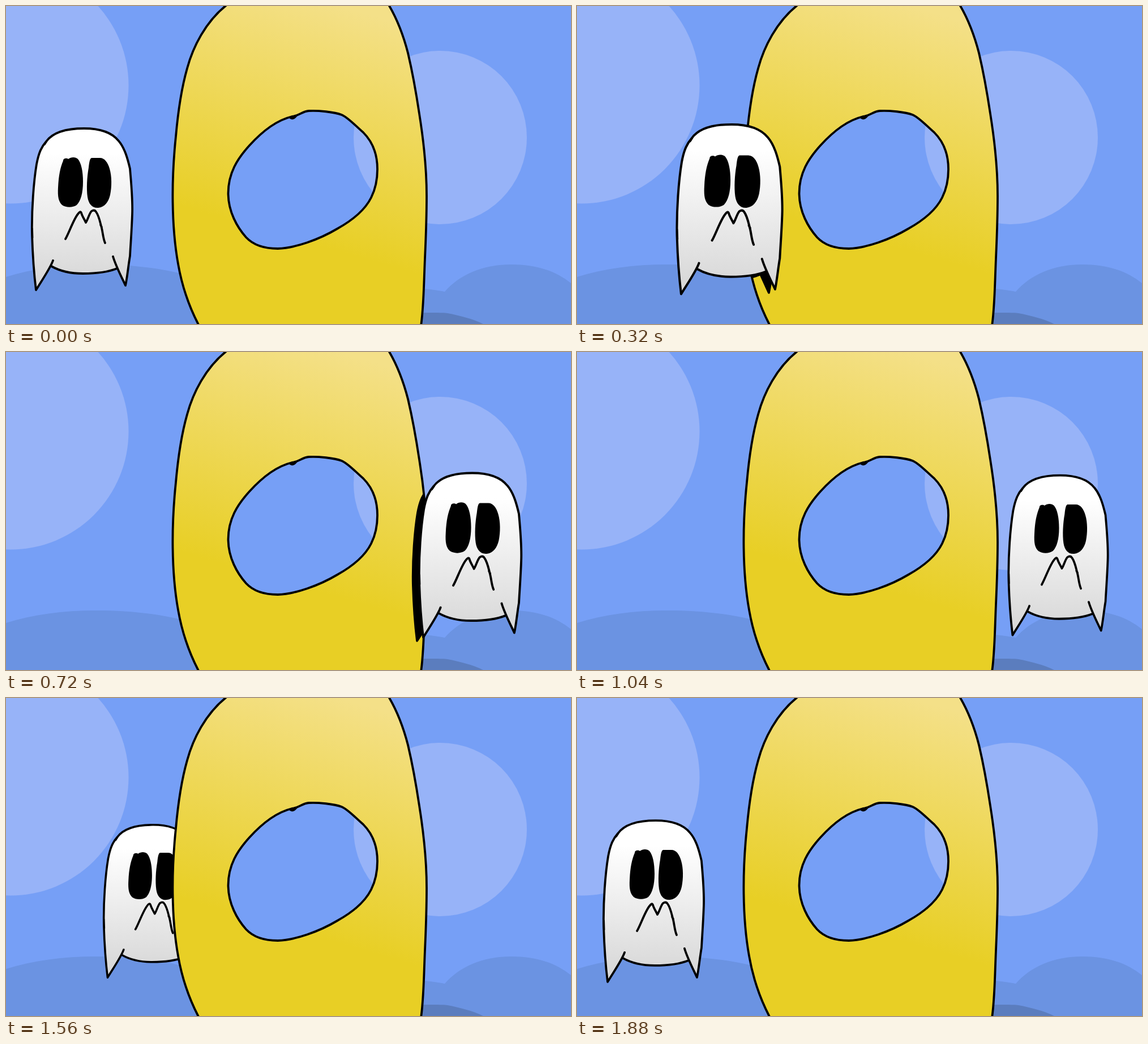
An HTML page for the animation above (1.92 s loop, 998x561 px).

```html
<!DOCTYPE html>
<html lang="en">
<head>
<meta charset="utf-8">
<title>Ghost orbit</title>
<style>
  html, body { margin: 0; width: 100%; height: 100%; overflow: hidden; background: #769ff6; }
  svg { display: block; width: 100vw; height: 100vh; }
  .line { fill: none; stroke: #000; stroke-width: 3.8; stroke-linecap: round; stroke-linejoin: round; }
</style>
</head>
<body>
<svg viewBox="0 0 998 561" preserveAspectRatio="none">
  <defs>
    <linearGradient id="gold" gradientUnits="userSpaceOnUse" x1="570" y1="-6" x2="455" y2="395">
      <stop offset="0" stop-color="#f4e088"/>
      <stop offset="1" stop-color="#e8cf25"/>
    </linearGradient>
    <linearGradient id="sheet" gradientUnits="userSpaceOnUse" x1="0" y1="260" x2="0" y2="478">
      <stop offset="0" stop-color="#fff"/>
      <stop offset="1" stop-color="#d9d9d9"/>
    </linearGradient>

    <path id="ring" fill-rule="evenodd" clip-rule="evenodd" d="
      M390 -2 C352 28 330 73 320 110 C308 152 303 196 300 230
      C296 268 294 305 294.500 345 C295 385 298 422 304 455 C311 495 323 530 341 564
      L733 564 C738 530 738 490 740 445 C742 400 743 365 743 335
      C743 285 738 240 730 190 C724 150 718 117 710 83 C702 52 692 25 676 -2 Z
      M505 195 C476 202 450 224 430 246 C409 269 392 295 392.500 332
      C393 363 408 390 424 408 C438 423 458 428 480 428
      C511 427 553 412 585 393 C612 378 634 360 645 338
      C653 322 656 306 656 288 C656 262 647 239 631 223
      C614 208 603 196 593 192 C580 187 551 184 535 185 C522 186 520 193 505 195 Z"/>
    <clipPath id="onRing"><use href="#ring" clip-rule="evenodd"/></clipPath>

    <path id="body" d="M53 501 C50 477 47 437 46 404 C45 359 49 309 54 279
      C58 258 63 248 71 239 C84 221 109 216 138 216 C167 216 187 223 199 238
      C210 251 215 270 219 287 C221 312 224 340 223 367 C222 397 220 421 219 441
      C216 458 214 480 211 493 L197 462 C179 470 159 472 136 472
      C110 472 94 467 80 459 Z"/>

    <g id="ghost">
      <use href="#body" fill="url(#sheet)"/>
      <path class="line" d="M83 449 C79 461 66 480 53 501 C50 477 47 437 46 404
        C45 359 49 309 54 279 C58 258 63 248 71 239 C84 221 109 216 138 216
        C167 216 187 223 199 238 C210 251 215 270 219 287 C221 312 224 340 223 367
        C222 397 220 421 219 441 C216 458 214 480 211 493 C206 482 194 459 189 442
        M80 459 C94 467 110 472 136 472 C159 472 179 470 196 463
        M72 238 L68 244 M46 392 L46.500 409"/>
      <path d="M101 273 C101 268 108 268 110 270 C115 266 123 266 127 270
        C133 277 136 292 136 310 C136 330 132 344 125 351 C118 356 106 356 99 351
        C93 345 91 337 92 320 C93 298 96 285 101 273 Z"/>
      <path d="M151 268 L166 268 C174 268 180 276 183 287 C187 300 187 319 184 333
        C181 346 174 355 163 356 C153 357 146 350 144 337 C142 322 143 302 146 285
        C147 276 148 269 151 268 Z"/>
      <path class="line" d="M105 411 C111 401 119 377 127 367
        C130 363 132 362 133 365 C135 372 139 377 141 382 C145 376 147 366 151 362
        C154 360 157 360 159 363 C164 370 166 380 168 388 C171 397 171 409 175 418
        M167 386 L169 390"/>
    </g>
  </defs>

  <rect width="998" height="561" fill="#769ff6"/>
  <g fill="#97b3f8">
    <circle cx="8" cy="140" r="208.500"/>
    <circle cx="767" cy="232" r="153"/>
  </g>
  <g fill="#6b93e2">
    <path d="M0 478 C48 463 100 456 158 456 C216 456 262 461 310 472 L340 561 H0 Z"/>
    <path d="M700 494 C730 498 755 500 775 504 C801 474 842 456 893 456
      C938 456 972 468 998 489 V561 H700 Z"/>
  </g>
  <path fill="#5b7dbe" d="M700 544 C720 541 758 540 780 542 C801 546 825 552 843 561 H700 Z"/>

  <use id="behind" href="#ghost"/>
  <use href="#ring" fill="url(#gold)"/>
  <g id="shade" clip-path="url(#onRing)">
    <use id="shadow" href="#body" stroke="#000" stroke-width="3.800" stroke-linejoin="round"/>
  </g>
  <use href="#ring" class="line"/>
  <path d="M499 196 C502 201 508 202 513 196 L518 190 L510 193 Z"/>
  <use id="front" href="#ghost"/>
</svg>

<script>
  const LOOP = 1920, STEP = 40, TURN = 940;
  const HOME = { x: 134, y: 358 };

  // time, centre x, scale
  const orbit = [
    [0, 134, 1], [320, 269, 1.05], [440, 486, 1.153], [560, 683, 1.087],
    [720, 819.5, 1.018], [920, 867, 1], [1040, 849.5, 0.989], [1120, 825, 0.981],
    [1280, 703.5, 0.927], [1410, 500, 0.84], [1560, 256, 0.945],
    [1680, 176, 0.98], [1880, 135, 0.999], [1920, 134, 1]
  ];

  const rate = (i, k) =>
    (orbit[i + 1][k] - orbit[i][k]) / (orbit[i + 1][0] - orbit[i][0]);

  // Slope at a key; flat where the value turns round.
  function slope(i, k) {
    if (i === 0 || i === orbit.length - 1) return 0;
    const a = rate(i - 1, k), b = rate(i, k);
    if (a * b <= 0) return 0;
    const before = orbit[i][0] - orbit[i - 1][0];
    const after = orbit[i + 1][0] - orbit[i][0];
    return (a * after + b * before) / (before + after);
  }

  function sample(t, k) {
    let i = 0;
    while (t >= orbit[i + 1][0]) i++;
    const h = orbit[i + 1][0] - orbit[i][0];
    const u = (t - orbit[i][0]) / h, v = 1 - u;
    return orbit[i][k] * v * v * (1 + 2 * u) + orbit[i + 1][k] * u * u * (3 - 2 * u)
      + h * u * v * (slope(i, k) * v - slope(i + 1, k) * u);
  }

  const [behind, front, shade, shadow] =
    ["behind", "front", "shade", "shadow"].map(id => document.getElementById(id));

  const place = (el, x, y, s) => el.setAttribute("transform",
    `translate(${x} ${y}) scale(${s}) translate(${-HOME.x} ${-HOME.y})`);
  const show = (el, on) => el.setAttribute("display", on ? "inline" : "none");

  function draw(now) {
    const t = Math.floor((now % LOOP) / STEP) * STEP;
    const x = sample(t, 1), s = sample(t, 2), near = t < TURN;
    place(behind, x, HOME.y, s);
    place(front, x, HOME.y, s);
    place(shadow, x - 11, HOME.y + 6, s);
    show(front, near);
    show(shade, near);
    show(behind, !near);
  }

  const start = performance.now();
  function tick() {
    draw(performance.now() - start);
    requestAnimationFrame(tick);
  }
  tick();
</script>
</body>
</html>
```
